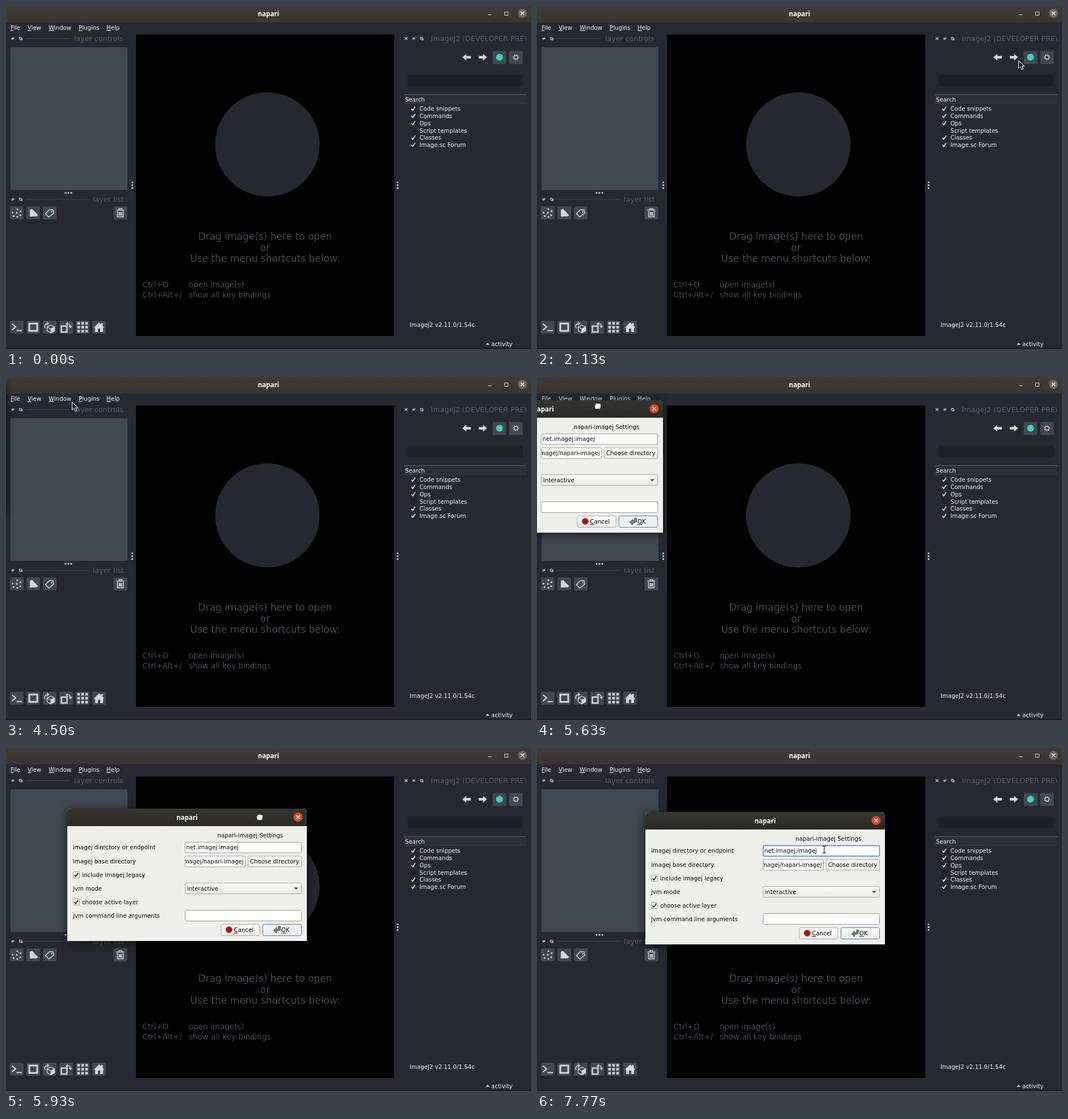
Write an HTML page that moves like this. It is 925x606 px and loops after 8 s.

```html
<!DOCTYPE html>
<html lang="en">
<head>
<meta charset="utf-8">
<title>napari</title>
<style>
  html, body { margin: 0; width: 100%; height: 100%; overflow: hidden; background: #262930; }
  svg { display: block; width: 925px; height: 606px; }
  text { font: 10.2px "DejaVu Sans", sans-serif; fill: #f0f1f2; white-space: pre; }
  text.title { font: bold 11.5px "Noto Sans", sans-serif; text-anchor: middle; fill: #fff; }
  text.dock { font-size: 12.7px; fill: #5a5d66; }
  text.big { font-size: 17px; text-anchor: middle; fill: #45474e; }
  text.keys { font-size: 13.5px; fill: #45474e; }
  #dialog text:not(.title) { fill: #111; }
  #dialog { filter: drop-shadow(0 3px 8px rgba(0, 0, 0, .65)); }
  .u { text-decoration: underline; }
  .btn { fill: #414851; }
  .ico { fill: #d5d7d9; }
  .line { fill: none; stroke: #d5d7d9; stroke-width: 1.5; }
  .box { fill: #fff; stroke: #9b9b98; }
  .push { fill: url(#push); stroke: #aaa9a5; }
</style>
</head>
<body>
<svg id="stage" viewBox="0 0 925 606"></svg>
<script>
const LOOP = 8000;

const text = (x, y, s, cls = '') => `<text x="${x}" y="${y}" class="${cls}">${s}</text>`;
const rect = (x, y, w, h, attrs) => `<rect x="${x}" y="${y}" width="${w}" height="${h}" ${attrs}/>`;
const dot = (x, y, r, attrs = 'class="ico"') => `<circle cx="${x}" cy="${y}" r="${r}" ${attrs}/>`;
const path = (d, attrs) => `<path d="${d}" ${attrs}/>`;
const at = (x, y, s) => `<g transform="translate(${x} ${y})">${s}</g>`;
const button = (x, y, icon, id = '') => at(x, y, rect(0, 0, 24, 23, `rx="2" class="btn" ${id}`) + icon);
const mnemonic = s => `<tspan class="u">${s[0]}</tspan>${s.slice(1)}`;
const tick = (x, y, color) =>
  path(`M${x + .4} ${y}l2.3 3 4.2-6.8`, `fill="none" stroke="${color}" stroke-width="1.5"`);

const icons = {
  points: [[13, 5], [18.5, 8.5], [18, 15.5], [12, 11.5], [4.5, 11], [6.5, 17], [13, 18.5]].map(p => dot(...p, 1.6)).join(''),
  shape: path('M6 6L10 4.5L20.5 15.5L18.5 17.5L6 18Z', 'class="ico"'),
  tag: path('M4.5 13L11 6H18L19 12L10.5 19Z', 'class="line" stroke-linejoin="round"') + dot(15.5, 9.5, 1.3),
  trash: path('M5 6.5H19M9.5 6V4H14.5V6M7 8V18.5H17V8M10 10V16.5M12 10V16.5M14 10V16.5', 'class="line"'),
  prompt: path('M3.5 5.5L10 11L3.5 16.5M11.5 17.5H21', 'class="line" style="stroke-width:2.1"'),
  square: path('M5 5H19V18H5Z', 'class="line" style="stroke-width:3"'),
  cube: path('M14 8L20.5 11V18L14 21.5L7.5 18V11ZM7.5 11L14 14.5L20.5 11M14 14.5V21.5', 'class="line" style="stroke-width:1.3"') +
    path('M14 14.5L20.5 11V18L14 21.5Z', 'class="ico"') +
    path('M4 13C1.5 8 5 4.5 9 5M7 2L10.5 5L7 8', 'class="line"'),
  transpose: path('M3.5 9.5H13.5V20H3.5Z', 'class="line" style="stroke-width:2.4"') +
    path('M13 6C17 4 20 7 19.5 11M17 9L19.5 12L22 9M15 3L12 6L15 8', 'class="line"'),
  grid: [5, 12, 19].map(x => [4.5, 11.5, 18.5].map(y => rect(x - 2.2, y - 2.2, 4.4, 4.4, 'class="ico"')).join('')).join(''),
  home: path('M2.5 12.5L12 3L15.5 6.4V4H18.5V9.4L21.5 12.5H19V20H14V14H10V20H5V12.5Z', 'class="ico"'),
  gear: dot(12, 11, 3.4, 'class="line" style="stroke-width:1.2"') +
    dot(12, 11, 4.5, 'class="line" style="stroke-width:1.3" stroke-dasharray="1.4 2.13"'),
  brand: dot(12, 11, 6, 'fill="#3bd0c0"'),
};

const dockIcons = (x, y) =>
  path(`M${x - 2.6} ${y}q2.6-3 5.2 0q-2.6 3-5.2 0M${x - 2} ${y + 2.4}l4-4.6`, 'class="line" style="stroke-width:1"') +
  path(`M${x + 11.5} ${y - 2}h3.4v3.4h-3.4zM${x + 13.5} ${y + 2.5}h3v-3.5`, 'class="line" style="stroke-width:1"');

const titleBar = () =>
  rect(0, 0, 925, 29, 'fill="url(#bar)"') + text(462.5, 18, 'napari', 'title') +
  path('M849 15.5H855.5M878.5 10.5H884.5V16.5H878.5Z', 'class="line" style="stroke-width:1"') +
  dot(910, 13, 8, 'fill="#6c6964"') +
  path('M907 10L913 16M913 10L907 16', 'class="line" style="stroke:#fff"');

const leftSide = () =>
  [[8, 'File'], [38, 'View'], [75, 'Window'], [128, 'Plugins'], [177, 'Help']]
    .map(([x, s]) => text(x, 42, mnemonic(s))).join('') +
  dockIcons(12, 57.5) + rect(35, 57, 77, 1, 'class="btn"') + text(120, 62, 'layer controls', 'dock') +
  rect(8, 73, 206, 252, 'class="btn" rx="1"') +
  [105, 110, 115].map(x => dot(x, 330, 1.6)).join('') +
  dockIcons(12, 341.5) + rect(34, 341, 112, 1, 'class="btn"') + text(153, 346, 'layer list', 'dock') +
  ['points', 'shape', 'tag'].map((k, i) => button(7 + 29 * i, 354, icons[k])).join('') +
  button(189.5, 354, icons.trash) +
  ['prompt', 'square', 'cube', 'transpose', 'grid', 'home']
    .map((k, i) => button(7 + 29 * i, 556, icons[k])).join('') +
  text(5, 601, 'Ready').replace('<text', '<text id="status"');

const canvas = () =>
  rect(229, 50.5, 455, 532.5, 'fill="#000"') +
  dot(460.5, 244.5, 92, 'fill="#25282f"') +
  ['Drag image(s) here to open', 'or', 'Use the menu shortcuts below:']
    .map((s, i) => text(456.5, 413 + 19.7 * i, s, 'big')).join('') +
  text(240.5, 497, 'Ctrl+O', 'keys') + text(322, 497, 'open image(s)', 'keys') +
  text(240.5, 515, 'Ctrl+Alt+/', 'keys') + text(322, 515, 'show all key bindings', 'keys') +
  [222.5, 690].map(x => [311.5, 316.5, 321.5].map(y => dot(x, y, 1.6)).join('')).join('');

const rightSide = () =>
  path('M702.5 55.2l4.6 4.6m0-4.6l-4.6 4.6', 'class="line" style="stroke-width:1.2"') +
  dockIcons(718.5, 57.5) +
  `<g clip-path="url(#dockClip)">${text(748.5, 62, 'ImageJ2 (DEVELOPER PREVIEW)', 'dock')}</g>` +
  path('M804 90.5L811 84.5V88.3H819V92.7H811V96.5Z', 'class="ico"') +
  path('M847.5 90.5L840.5 84.5V88.3H833V92.7H840.5V96.5Z', 'class="ico"') +
  button(857.5, 79.5, icons.brand) + button(886.5, 79.5, icons.gear, 'id="gear"') +
  rect(707.5, 121.5, 203, 20, 'rx="2" fill="#1e2126"') +
  rect(701, 156.5, 216, 15.5, 'fill="#2c2f36"') +
  rect(701, 156, 216, 1, 'fill="#62656b"') + rect(701, 171.5, 216, 1, 'fill="#3f434a"') +
  text(703, 169, 'Search') +
  ['Code snippets', 'Commands', 'Ops', 'Script templates', 'Classes', 'Image.sc Forum'].map((s, i) => {
    const y = 181.5 + 12.8 * i;
    return rect(712.5, y - 5, 10, 10, 'fill="#202329"') + (i === 3 ? '' : tick(714, y, '#f0f1f2')) +
      text(728.5, y + 3.7, s);
  }).join('') +
  text(711, 567, 'ImageJ2 v2.11.0/1.54c') +
  path('M845 598.5L848.5 595L852 598.5Z', 'class="ico"') + text(855, 601, 'activity') +
  rect(0, 604, 925, 2, 'fill="#1f1c22"');

const dialog = () =>
  path('M0 234V7Q0 0 7 0H415Q422 0 422 7V234Z', 'fill="#efefeb"') +
  path('M0 31V7Q0 0 7 0H415Q422 0 422 7V31Z', 'fill="url(#dlgBar)"') +
  text(211, 20, 'napari', 'title') +
  dot(406.5, 15, 8, 'fill="#dd4a22"') +
  path('M403.5 12L409.5 18M409.5 12L403.5 18', 'class="line" style="stroke:#fff"') +
  text(264.5, 51, 'napari-imagej Settings') +
  [[10, 72, 'imagej directory or endpoint'], [10, 96.7, 'imagej base directory'], [26, 120.7, 'include imagej legacy'],
   [10, 144.5, 'jvm mode'], [26, 168.5, 'choose active layer'], [10, 192.5, 'jvm command line arguments']]
    .map(r => text(...r)).join('') +
  [111.5, 159.5].map(y => rect(10.5, y, 11, 11, 'rx="1.5" class="box"') + tick(12.3, y + 5.8, '#111')).join('') +
  rect(207.5, 59.5, 205, 18.5, 'rx="2" class="box" id="field"') + text(209.5, 72, 'net.imagej:imagej') +
  rect(302, 61.5, 1, 13, 'fill="#111" id="caret"') +
  rect(207.5, 84, 106, 19, 'rx="2" class="box"') +
  `<g clip-path="url(#pathClip)"><text x="310.5" y="96.7" text-anchor="end">imagej/napari-imagej</text></g>` +
  rect(318.5, 84, 94, 19, 'rx="2" class="push"') + text(322, 96.7, 'Choose directory') +
  rect(207.5, 131.5, 205, 19, 'rx="2" class="push"') + text(211, 144.5, 'interactive') +
  path('M399 139.5H407L403 143.5Z', 'fill="#555"') +
  rect(207.5, 179.5, 205, 19, 'rx="2" class="box"') +
  rect(271, 204.5, 68, 20, 'rx="2" class="push"') +
  dot(285, 214, 5.5, 'fill="#c80000" stroke="#777" stroke-width="1"') + text(293.5, 218.3, mnemonic('Cancel')) +
  rect(344.5, 204.5, 68, 20, 'rx="2" class="push" id="ok" style="stroke:#4e83a5"') +
  path('M363 215.5l5.5-5v2.8l3.5-1.2v-4h3.5v6.5l-7 3v3z', 'fill="#75805f" stroke="#4d5540" stroke-width=".8"') +
  text(377, 218.3, mnemonic('OK'));

const gradient = (id, a, b) =>
  `<linearGradient id="${id}" x2="0" y2="1"><stop stop-color="${a}"/><stop offset="1" stop-color="${b}"/></linearGradient>`;

const pointers = {
  arrow: path('M-.5-.5V13L2.8 10.2L5.2 15.5L7.6 14.4L5.3 9.3H9.8Z', 'fill="#111" stroke="#fff" stroke-width="1"'),
  hand: path('M-4.5 5.5L-6-.5Q-5.5-2-4-1V-3.5Q-3-5-1.8-3.8Q-.5-6 .8-4Q2-5.5 3.2-3.6Q4.8-4.4 5.5-2.6V2L4 5.5Z',
    'fill="#fff" stroke="#222" stroke-width=".8"'),
  beam: path('M-2.8-6.5H-.8L0-5.8L.8-6.5H2.8M0-5.8V4.8M-2.8 5.5H-.8L0 4.8L.8 5.5H2.8',
    'fill="none" stroke="#111" stroke-width="1.1"'),
};

const stage = document.getElementById('stage');
stage.innerHTML =
  `<defs>${gradient('bar', '#3f3c37', '#393631')}${gradient('dlgBar', '#373531', '#2b2926')}${gradient('push', '#fdfdfc', '#ecebe7')}
   <clipPath id="dockClip">${rect(745, 45, 172, 25, '')}</clipPath><clipPath id="pathClip">${rect(208, 85, 105, 17, '')}</clipPath></defs>` +
  rect(0, 0, 925, 606, 'fill="#262930"') + leftSide() + canvas() + rightSide() + titleBar() +
  `<g id="dialog">${dialog()}</g>` +
  Object.entries(pointers).map(([k, s]) => `<g id="${k}">${s}</g>`).join('');

const el = id => document.getElementById(id);
const show = (id, on) => { el(id).style.display = on ? '' : 'none'; };
const move = (id, [x, y]) => el(id).setAttribute('transform', `translate(${Math.round(x)} ${Math.round(y)})`);

// Pointer moves: start, end, number of jumps, points along the way
const moves = [
  [500, 1230, 9, [[375, -4], [425, 25], [436, 55]]],
  [1330, 2130, 9, [[436, 55], [600, 75], [760, 92], [849, 97]]],
  [2270, 2430, 3, [[849, 97], [905, 97]]],
  [3500, 4300, 9, [[905, 97], [232, 58]]],
  [4400, 4900, 6, [[232, 58], [175, 51], [117, 45], [75, 40], [42, 36], [10, 33], [-20, 33]]],
  [6630, 6930, 5, [[546, 128], [506, 180]]],
];

function pointerAt(t) {
  const m = moves.filter(m => t >= m[0]).pop();
  if (!m) return [-50, -50];
  const [start, end, n, pts] = m;
  const k = Math.min(n, Math.floor((t - start) / ((end - start) / (n - 1)) + 1.001));
  const s = k / n * (pts.length - 1), i = Math.min(pts.length - 2, Math.floor(s + 1e-6));
  return pts[i].map((a, j) => a + (pts[i + 1][j] - a) * (s - i));
}

// Drag: time, dialog x and y, hand x and y
const drag = [
  [5467, -424, 3, -74, 20],
  [5633, -201, 41, 106, 51],
  [5933, 108, 107, 447, 122],
  [6267, 181, 112, 530, 129],
  [6467, 191, 113, 540, 130],
];

// Monotone cubic through the drag keys
function dragAt(t, c) {
  const slope = i => (drag[i + 1][c] - drag[i][c]) / (drag[i + 1][0] - drag[i][0]);
  const tangent = i => {
    if (i === 0) return slope(0);
    if (i === drag.length - 1) return 0;
    const a = slope(i - 1), b = slope(i);
    return 2 * a * b / (a + b);
  };
  const last = drag.length - 1;
  if (t <= drag[0][0]) return drag[0][c];
  if (t >= drag[last][0]) return drag[last][c];
  const i = drag.findIndex(k => k[0] > t) - 1, h = drag[i + 1][0] - drag[i][0], u = (t - drag[i][0]) / h;
  return drag[i][c] * (1 + 2 * u) * (1 - u) ** 2 + h * tangent(i) * u * (1 - u) ** 2 +
    drag[i + 1][c] * u * u * (3 - 2 * u) + h * tangent(i + 1) * u * u * (u - 1);
}

function draw(t) {
  const step = Math.floor((t + 4) * 3 / 100) * 100 / 3 + .5;
  const dragging = t >= 5490 && t < 6470;
  let p = pointerAt(t);
  if (t >= 6470 && t < 6630) p = [546, 128];
  const inField = t >= 6470 && p[1] > 172;

  move('dialog', [dragAt(step, 1), dragAt(step, 2)]);
  move('hand', [dragAt(step, 3), dragAt(step, 4)]);
  move('arrow', p);
  move('beam', p);
  show('dialog', t >= 3000);
  show('hand', dragging);
  show('beam', inField);
  show('arrow', !dragging && !inField);
  show('status', t < 2130 && p[0] > 229 && p[0] < 684 && p[1] > 50);

  const hover = p[0] > 886 && p[0] < 910;
  el('gear').style.fill = t >= 2800 && t < 2900 ? '#6a7380' : hover ? '#5a626c' : '';
  const focus = t >= 7130;
  el('field').style.stroke = focus ? '#3f86b5' : '';
  el('field').style.strokeWidth = focus ? 1.4 : '';
  el('ok').style.fill = focus ? '' : '#eef2f4';
  show('caret', t >= 7230 && t < 7770);
}

const begin = performance.now();
function tickFrame() {
  draw((performance.now() - begin) % LOOP);
  requestAnimationFrame(tickFrame);
}
tickFrame();
</script>
</body>
</html>
```
